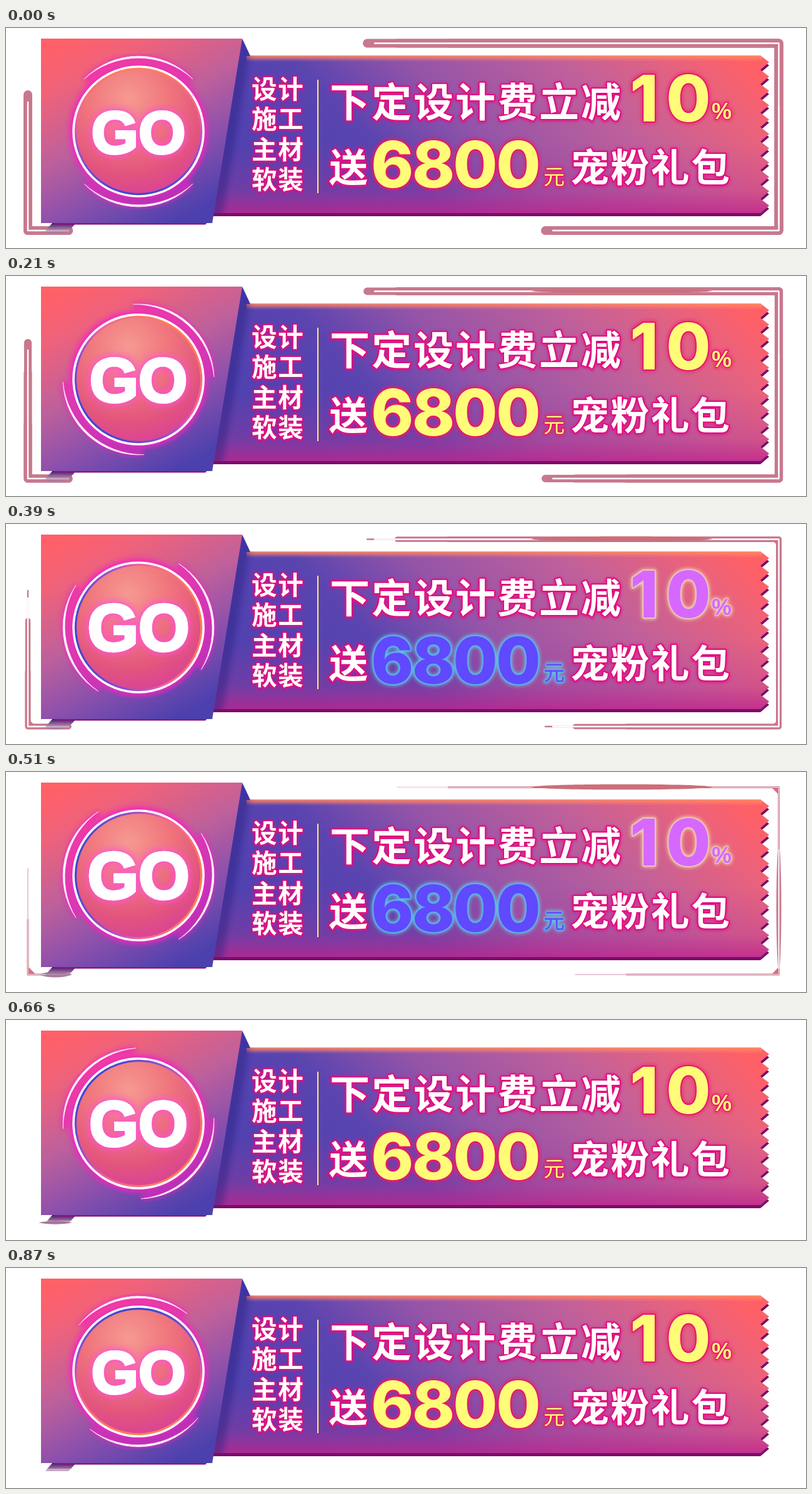
Write an HTML page that moves like this. It is 1280 px wide and 353 px high and loops after 900 ms.

```html
<!DOCTYPE html>
<html lang="zh-CN">
<head>
<meta charset="utf-8">
<title>GO</title>
<style>
  html, body { margin: 0; width: 100%; height: 100%; overflow: hidden; background: #fff; }
  svg { display: block; width: 100%; height: 100%; }
  .cjk { font-family: "Noto Sans CJK SC", "Noto Sans CJK", sans-serif; font-weight: 700; }
  .white { fill: #fff; stroke: #e0107c; paint-order: stroke; stroke-linejoin: round; filter: url(#pinkGlow); }
  .num { paint-order: stroke; stroke-linejoin: round; }
  .digits { font: 800 103px Inter, "Liberation Sans", sans-serif; text-anchor: middle; }
  .sunny { fill: #fffc78; stroke: #e4186c; filter: url(#redGlow); }
  .violet { fill: #d668ff; stroke: #ecc0c0; filter: url(#creamGlow); }
  .blue { fill: #6048ff; stroke: #5aaee8; filter: url(#cyanGlow); }
</style>
</head>
<body>
<svg viewBox="0 0 1280 353">
  <defs>
    <linearGradient id="panelFill" gradientUnits="userSpaceOnUse" x1="95" y1="20" x2="255" y2="320">
      <stop offset="0" stop-color="#ff6068"/><stop offset=".18" stop-color="#f0627a"/>
      <stop offset=".48" stop-color="#bd609c"/><stop offset=".72" stop-color="#8c50ac"/>
      <stop offset="1" stop-color="#4c40ae"/>
    </linearGradient>
    <linearGradient id="ribbonFill" gradientUnits="userSpaceOnUse" x1="500" y1="300" x2="965" y2="-165">
      <stop offset="0" stop-color="#5042b0"/><stop offset=".22" stop-color="#5a44b0"/>
      <stop offset=".42" stop-color="#9454a8"/><stop offset=".68" stop-color="#c0609a"/>
      <stop offset=".88" stop-color="#e8627e"/><stop offset="1" stop-color="#ff6066"/>
    </linearGradient>
    <linearGradient id="ribbonBase" x1="0" y1="0" x2="0" y2="1">
      <stop offset=".55" stop-color="#c0308c" stop-opacity="0"/>
      <stop offset=".85" stop-color="#c0308c" stop-opacity=".28"/>
      <stop offset="1" stop-color="#c0248c" stop-opacity=".8"/>
    </linearGradient>
    <linearGradient id="topEdge" x1="0" y1="0" x2="0" y2="1">
      <stop offset="0" stop-color="#ff8a68"/><stop offset="1" stop-color="#ff8a68" stop-opacity="0"/>
    </linearGradient>
    <linearGradient id="foldFill" x1="0" y1="0" x2="0" y2="1">
      <stop offset="0" stop-color="#3c1c78"/><stop offset="1" stop-color="#a0709c"/>
    </linearGradient>
    <linearGradient id="ringTint" gradientUnits="userSpaceOnUse" x1="0" y1="-104" x2="0" y2="104">
      <stop offset="0" stop-color="#ff8050"/><stop offset=".4" stop-color="#f060a0"/>
      <stop offset=".62" stop-color="#a050d0"/><stop offset="1" stop-color="#3c46d0"/>
    </linearGradient>
    <radialGradient id="ballFill" cx=".42" cy=".24" r=".8">
      <stop offset="0" stop-color="#f69a92"/><stop offset=".4" stop-color="#f0767c"/>
      <stop offset=".75" stop-color="#e2547e"/><stop offset="1" stop-color="#d8409a"/>
    </radialGradient>
    <filter id="soft" x="-20%" y="-20%" width="140%" height="140%"><feGaussianBlur stdDeviation="4"/></filter>
    <filter id="pinkGlow"><feDropShadow dx="0" dy="1" stdDeviation="2.5" flood-color="#e8108c"/></filter>
    <filter id="redGlow"><feDropShadow dx="0" dy="0" stdDeviation="3" flood-color="#f01468"/></filter>
    <filter id="creamGlow"><feDropShadow dx="0" dy="0" stdDeviation="3" flood-color="#f4f09c"/></filter>
    <filter id="cyanGlow"><feDropShadow dx="0" dy="0" stdDeviation="3" flood-color="#5ce4ec"/></filter>
    <filter id="goGlow" x="-25%" y="-40%" width="150%" height="180%">
      <feDropShadow dx="0" dy="0" stdDeviation="4" flood-color="#ff50d8"/>
      <feDropShadow dx="0" dy="0" stdDeviation="7" flood-color="#fa58c8" flood-opacity=".8"/>
    </filter>
    <clipPath id="ribbonClip"><path class="ribbon"/></clipPath>
    <g id="arc">
      <path d="M-84-82A118 118 0 0 1 84-82" fill="none" stroke="#f020c0" stroke-width="10" opacity=".85" filter="url(#soft)"/>
      <path d="M-87-84A121 121 0 0 1 87-84A129 129 0 0 0-87-84Z" fill="#fff" stroke="#ffd0f4" stroke-width=".8"/>
    </g>
  </defs>

  <!-- ribbon -->
  <path class="ribbon" transform="translate(0 5)" fill="#7c0a68"/>
  <path class="ribbon" fill="url(#ribbonFill)"/>
  <path class="ribbon" fill="url(#ribbonBase)"/>
  <g clip-path="url(#ribbonClip)">
    <path d="M385 44H1210V54H385Z" fill="url(#topEdge)"/>
    <path d="M360 40H390L346 305H320Z" fill="#2a2080" opacity=".45" filter="url(#soft)"/>
  </g>

  <g id="frameLines" fill="none" stroke-linecap="round" stroke-linejoin="round"></g>

  <!-- panel and folds -->
  <path d="M378 17L391 45H370Z" fill="#4034a4"/>
  <path d="M74 313H112L104 322H66Z" fill="url(#foldFill)"/>
  <path d="M66 322H104L100 326H63Z" fill="#a0709c" opacity=".6"/>
  <path d="M78 312H322L319 315.5H80Z" fill="#8a1478"/>
  <path d="M56 17H378L330 313H56Z" fill="url(#panelFill)"/>

  <!-- button -->
  <g transform="translate(212 166)">
    <circle r="104" fill="none" stroke="#f420c0" stroke-width="12" filter="url(#soft)"/>
    <circle r="102" fill="url(#ballFill)"/>
    <g id="spin">
      <use href="#arc"/><use href="#arc" transform="rotate(180)"/>
      <circle r="101" fill="none" stroke="url(#ringTint)" stroke-width="4"/>
      <circle r="104" fill="none" stroke="#fff" stroke-width="3.6"/>
    </g>
    <g id="go">
      <text y="34.5" text-anchor="middle" font-family="'Liberation Sans', Arial, sans-serif" font-weight="700"
        font-size="97" fill="#fff" stroke="#fff" stroke-width="4" filter="url(#goGlow)">GO</text>
    </g>
  </g>

  <!-- wording -->
  <g class="cjk white" font-size="40.5" letter-spacing="1.8" stroke-width="3">
    <text x="393" y="112.5">设计</text><text x="393" y="161">施工</text>
    <text x="393" y="209.5">主材</text><text x="393" y="258">软装</text>
  </g>
  <path d="M499 83V265" stroke="#ffec80" stroke-width="2"/>
  <g class="cjk white" stroke-width="4">
    <text x="518" y="141.5" font-size="64" letter-spacing="3">下定设计费立减</text>
    <text x="517" y="246.5" font-size="62">送</text>
    <text x="903" y="246.5" font-size="62" letter-spacing="2.3">宠粉礼包</text>
  </g>
  <g class="num" id="percent" stroke-width="4">
    <text class="digits" x="1021 1092" y="150">10</text>
    <text x="1129" y="146" font-family="'Liberation Sans', Arial, sans-serif" font-weight="700" font-size="36" stroke-width="3">%</text>
  </g>
  <g class="num" id="amount" stroke-width="4">
    <text class="digits" x="618 684 751 820" y="256">6800</text>
    <text class="cjk" x="860" y="251" font-size="34" style="font-weight:500" stroke-width="3">元</text>
  </g>
</svg>
<script>
const LOOP = 900, STEP = 30;
const $ = id => document.getElementById(id);
const clamp = v => Math.max(0, Math.min(1, v));

function add(parent, attrs) {
  const el = document.createElementNS('http://www.w3.org/2000/svg', 'path');
  for (const key in attrs) el.setAttribute(key, attrs[key]);
  return parent.appendChild(el);
}

// ribbon outline with a saw-tooth right end
let outline = 'M325 44H1207';
for (let k = 0; k < 11; k++) outline += `L1221 ${55 + 23 * k}L1207 ${67 + 23 * k}`;
document.querySelectorAll('.ribbon').forEach(p => p.setAttribute('d', outline + 'H325Z'));

// thin lines: stacked strokes whose outer ends wear away first
const ROSE = '#c8788e';
const LAYERS = [{ inset: 0, wear: 2.6 }, { inset: 48, wear: 1.25 }, { inset: 130, wear: 1.1 }];
const BRACKETS = [
  { d: 'M578 24.5H1236.5V325H863', ends: 2 },
  { d: 'M35 107V325H100', ends: 1 }
];
const host = $('frameLines');

function inset(path, start, ends) {
  const length = path.getTotalLength();
  path.setAttribute('stroke-dasharray', `${length - start * ends} ${length * 2}`);
  path.setAttribute('stroke-dashoffset', -start);
  return path;
}

const strokes = BRACKETS.flatMap(({ d, ends }) => LAYERS.map(layer => ({
  wear: layer.wear,
  el: inset(add(host, { d, stroke: ROSE }), layer.inset, ends)
})));

const lens = (x0, y0, x1, y1, h) => x0 === x1
  ? `M${x0} ${y0}C${x0 - h} ${y0 + 30} ${x0 - h} ${y1 - 30} ${x0} ${y1}C${x0 + h} ${y1 - 30} ${x0 + h} ${y0 + 30} ${x0} ${y0}Z`
  : `M${x0} ${y0}C${x0 + 15} ${y0 - h} ${x1 - 15} ${y0 - h} ${x1} ${y1}C${x1 - 15} ${y0 + h} ${x0 + 15} ${y0 + h} ${x0} ${y0}Z`;

const sideSpark = add(host, { fill: ROSE });
const footSpark = add(host, { fill: '#a8789a' });
const corners = add(host, {
  fill: '#d87088',
  d: 'M36 313V325H48ZM1236 313V326H1224ZM1225 25H1236V36Z'
});
const cores = BRACKETS.map(({ d, ends }) => inset(add(host, { d, stroke: '#fff' }), 12, ends));
const sideCore = add(host, { d: 'M1236.5 125V315', stroke: '#fff', 'stroke-width': 2 });
const topSpark = add(host, { fill: '#cc6e7a' });

function drawLines(t) {
  const loss = 14 * (t / 570) ** 3;
  const width = wear => Math.max(0, 14 - loss * wear);
  strokes.forEach(s => s.el.setAttribute('stroke-width', width(s.wear)));
  cores.forEach(c => c.setAttribute('stroke-width', Math.min(2.4, width(1.1) * .3)));
  const spark = clamp(1 - (t - 510) / 60);
  topSpark.setAttribute('d', lens(840, 24, 1130, 24, 5.8 * spark * clamp(t / 300)));
  sideSpark.setAttribute('d', lens(1236.5, 110, 1236.5, 325, 5.3 * spark));
  footSpark.setAttribute('d', lens(52, 325, 106, 325, 6 * clamp(1 - (t - 510) / 360)));
  corners.style.display = t >= 300 && t < 570 ? '' : 'none';
  sideCore.style.display = t < 570 ? '' : 'none';
}

function draw(now) {
  const t = Math.floor(now % LOOP / STEP) * STEP;
  const pulse = 1 + .085 * (1 - Math.cos(2 * Math.PI * t / LOOP)) / 2;
  const swapped = t >= 300 && t < 600;
  $('spin').setAttribute('transform', `rotate(${t / LOOP * 180})`);
  $('go').setAttribute('transform', `scale(${pulse})`);
  $('percent').setAttribute('class', 'num ' + (swapped ? 'violet' : 'sunny'));
  $('amount').setAttribute('class', 'num ' + (swapped ? 'blue' : 'sunny'));
  drawLines(t);
}

const start = performance.now();
function tick() {
  draw(performance.now() - start);
  requestAnimationFrame(tick);
}
tick();
</script>
</body>
</html>
```
